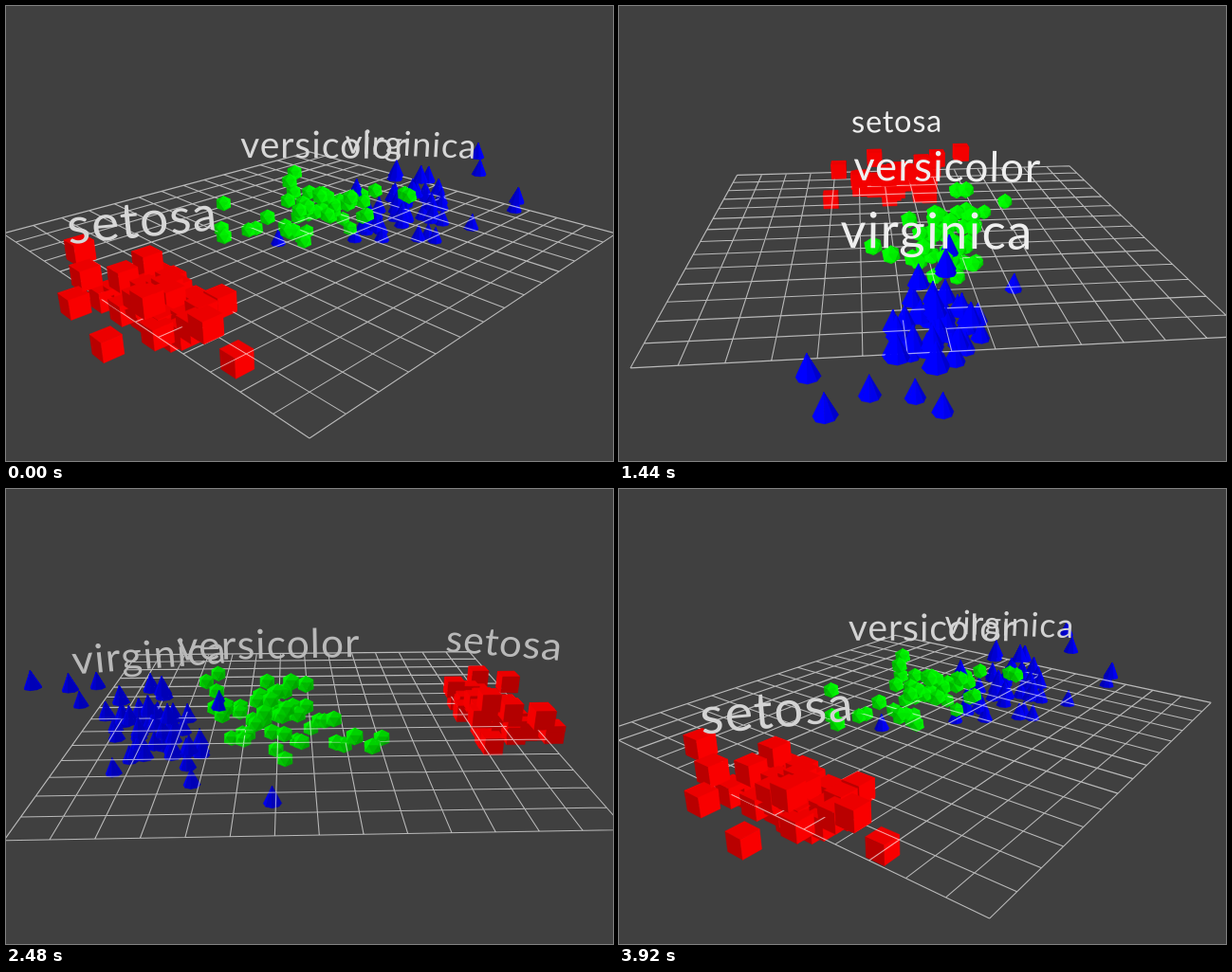
These frames come from a looping animation (640 by 480 pixels, 4 s). An HTML page with a canvas:

```html
<!DOCTYPE html>
<html lang="en">
<head>
<meta charset="utf-8">
<title>Three clusters</title>
<style>
  html, body { margin: 0; width: 100%; height: 100%; overflow: hidden; background: #404040; }
  canvas { display: block; }
</style>
</head>
<body>
<canvas id="stage" width="640" height="480"></canvas>
<script>
const ctx = document.getElementById('stage').getContext('2d');
const STEP = 80, STEPS = 50;
const FOCAL = 695, DIST = 21.29, TILT = 0.391;
const SIN = Math.sin(TILT), COS = Math.cos(TILT);
const HALF = 7;            // grid half size in cells
const SCALE = 2.34;        // data units to cells
const LIGHT = [0.69, 0.58, 0.43];
const FONT = 100, TEXT = 1.22, TRACK = 2.5;
const LIFT = 1.87;         // label height above its cluster

const dot = (a, b) => a[0] * b[0] + a[1] * b[1] + a[2] * b[2];
const sub = (a, b) => a.map((x, i) => x - b[i]);
const add = (a, b, k = 1) => a.map((x, i) => x + b[i] * k);
const cross = (a, b) => [a[1] * b[2] - a[2] * b[1], a[2] * b[0] - a[0] * b[2], a[0] * b[1] - a[1] * b[0]];
const unit = a => { const l = Math.hypot(...a); return a.map(x => x / l); };
const mid = pts => [0, 1, 2].map(i => pts.reduce((s, p) => s + p[i], 0) / pts.length);
const dist2 = (a, b) => { const d = sub(a, b); return dot(d, d); };

function ring(n, r, z, turn = 0) {
  return Array.from({ length: n }, (_, i) => {
    const a = (i + turn) / n * Math.PI * 2;
    return [r * Math.cos(a), r * Math.sin(a), z];
  });
}

// Meshes are convex and hold the origin, so normals can be turned outward.
const mesh = faces => faces.map(pts => {
  let n = unit(cross(sub(pts[1], pts[0]), sub(pts[2], pts[0])));
  if (dot(n, mid(pts)) < 0) n = n.map(x => -x);
  const lit = (1 + dot(n, LIGHT)) / 2;
  return { pts, n, shade: Math.min(1, 0.64 + 0.4 * lit) };
});

function cube(h) {
  const r = h * Math.SQRT2, a = ring(4, r, -h, 0.5), b = ring(4, r, h, 0.5);
  return mesh([a, b, ...a.map((p, i) => [p, a[(i + 1) % 4], b[(i + 1) % 4], b[i]])]);
}

function ico(r) {
  const z = r / Math.sqrt(5), a = ring(5, 2 * z, z), b = ring(5, 2 * z, -z, 0.5), faces = [];
  for (let i = 0; i < 5; i++) {
    const j = (i + 1) % 5;
    faces.push([[0, 0, r], a[i], a[j]], [a[i], b[i], a[j]], [b[i], a[j], b[j]], [[0, 0, -r], b[i], b[j]]);
  }
  return mesh(faces);
}

function cone(r, h) {
  const a = ring(8, r, -h);
  return mesh([a, ...a.map((p, i) => [p, a[(i + 1) % 8], [0, 0, h]])]);
}

// Each cluster is a correlated random cloud plus a few points that stand apart.
const groups = [
  {
    name: 'setosa', rgb: [255, 0, 0], mesh: cube(0.285),
    mean: [-2.64, 0.19, -0.01], spread: [0.18, 0.3, 0.14], mix: 0.35,
    apart: [
      [-2.4, 1.35, -0.3], [-2.85, -0.95, 0.35], [-2.65, 1.2, 0.15],
      [-3.2, 0.15, -0.3], [-3.2, -0.5, -0.05], [-2.2, 0.85, 0.1]
    ]
  },
  {
    name: 'versicolor', rgb: [0, 255, 0], mesh: ico(0.26),
    mean: [0.53, -0.25, 0.12], spread: [0.43, 0.27, 0.25], mix: 0.55,
    apart: [
      [1.3, 0.7, 0.4], [1.45, 0.5, 0.35], [-0.75, -1, 0],
      [-0.5, -1.25, 0.25], [-0.9, -0.75, 0], [0.25, -0.55, 0.7]
    ]
  },
  {
    name: 'virginica', rgb: [0, 0, 255], mesh: cone(0.27, 0.29),
    mean: [2.11, 0.06, -0.1], spread: [0.43, 0.27, 0.28], mix: 0.5,
    apart: [
      [3.8, 0.25, 0.5], [3.5, 1.2, -0.15], [3.25, 1.35, 0.1],
      [0.5, -1.2, -0.55], [2.9, 0.8, -0.4], [3.4, 0.55, 0.35]
    ]
  }
];
const COUNT = 50;

let seed = 41;
const rand = () => (seed = (seed * 16807) % 2147483647) / 2147483647;
const bell = () => (rand() + rand() - 1) * 2.45;

function cloud({ mean, spread, mix, apart }) {
  return Array.from({ length: COUNT - apart.length }, () => {
    const a = bell(), b = mix * a + Math.sqrt(1 - mix * mix) * bell();
    return [a, b, bell()].map((x, i) => mean[i] + spread[i] * x);
  });
}

const place = ([a, b, c]) => [b * SCALE, a * SCALE, c * SCALE];

const faces = groups.flatMap(g => [...g.apart, ...cloud(g)].flatMap(p => {
  const at = place(p);
  return g.mesh.map(f => {
    const pts = f.pts.map(v => add(v, at));
    return {
      pts, n: f.n, mid: mid(pts), top: Math.max(...pts.map(v => v[2])),
      color: `rgb(${g.rgb.map(c => Math.round(c * f.shade))})`
    };
  });
}));

ctx.font = `${FONT}px Lato, "Open Sans", sans-serif`;
const labels = groups.map(({ name, mean }) => {
  const width = s => ctx.measureText(s).width + TRACK * s.length;
  const chars = [...name].map((ch, i) => ({
    ch, x: (width(name.slice(0, i + 1)) - (width(ch) + width(name)) / 2) * TEXT / FONT
  }));
  return { chars, at: add(place(mean), [0, 0, LIFT]) };
});

let cq, sq, cam;
function aim(angle) {
  cq = Math.cos(angle + Math.PI / 4);
  sq = Math.sin(angle + Math.PI / 4);
  cam = [DIST * COS * sq, -DIST * COS * cq, DIST * SIN];
}

function project([x, y, z]) {
  const u = x * cq + y * sq, v = x * sq - y * cq;
  const k = FOCAL / (DIST - v * COS - z * SIN);
  return [320 + u * k, 240 + (v * SIN - z * COS) * k];
}

// The part of a polygon over the floor.
function above(pts) {
  const out = [];
  pts.forEach((a, i) => {
    const b = pts[(i + 1) % pts.length];
    if (a[2] >= 0) out.push(a);
    if ((a[2] >= 0) !== (b[2] >= 0)) out.push(add(a, sub(b, a), a[2] / (a[2] - b[2])));
  });
  return out;
}

function fillFace(pts, color) {
  ctx.beginPath();
  for (const p of pts) ctx.lineTo(...project(p));
  ctx.closePath();
  ctx.fillStyle = ctx.strokeStyle = color;
  ctx.fill();
  ctx.stroke();
}

function drawGrid() {
  ctx.lineWidth = 1.1;
  ctx.strokeStyle = 'rgba(255,255,255,.63)';
  ctx.beginPath();
  for (let i = -HALF; i <= HALF; i++) {
    for (const [a, b] of [[[i, -HALF, 0], [i, HALF, 0]], [[-HALF, i, 0], [HALF, i, 0]]]) {
      ctx.moveTo(...project(a));
      ctx.lineTo(...project(b));
    }
  }
  ctx.stroke();
}

// Labels face the camera; each letter gets its own local perspective.
function letters(gray) {
  return labels.flatMap(({ chars, at }) => {
    const back = unit(sub(cam, at));
    const right = unit(cross([0, 0, 1], back)), up = cross(back, right);
    return chars.map(({ ch, x }) => {
      const p = add(at, right, x);
      return { far: dist2(p, cam), draw: () => drawLetter(ch, p, right, up, gray) };
    });
  });
}

function drawLetter(ch, p, right, up, gray) {
  const e = 0.1, k = TEXT / FONT / e;
  const o = project(p), r = project(add(p, right, e)), t = project(add(p, up, e));
  ctx.save();
  ctx.setTransform((r[0] - o[0]) * k, (r[1] - o[1]) * k, (o[0] - t[0]) * k, (o[1] - t[1]) * k, o[0], o[1]);
  ctx.textAlign = 'center';
  ctx.fillStyle = `rgb(${gray},${gray},${gray})`;
  ctx.fillText(ch, 0, 0);
  ctx.restore();
}

function draw(step) {
  const angle = step / STEPS * Math.PI * 2;
  aim(angle);
  ctx.fillStyle = '#404040';
  ctx.fillRect(0, 0, 640, 480);
  ctx.lineJoin = 'round';
  ctx.lineWidth = 0.5;

  const seen = faces.filter(f => dot(f.n, sub(cam, f.mid)) > 0)
    .map(f => ({ ...f, far: dist2(f.mid, cam) }))
    .sort((a, b) => b.far - a.far);
  for (const f of seen) fillFace(f.pts, f.color);
  drawGrid();

  // Seen from above, everything over the floor hides what lies under it.
  const gray = Math.round(212 + 36 * Math.cos(angle - 1.48));
  const upper = seen.filter(f => f.top > 0)
    .map(f => ({ far: f.far, draw: () => fillFace(above(f.pts), f.color) }));
  ctx.lineWidth = 0.5;
  for (const item of [...upper, ...letters(gray)].sort((a, b) => b.far - a.far)) item.draw();
}

let shown = -1;
function tick() {
  const step = Math.floor(performance.now() / STEP) % STEPS;
  if (step !== shown) draw(shown = step);
  requestAnimationFrame(tick);
}
tick();
</script>
</body>
</html>
```
